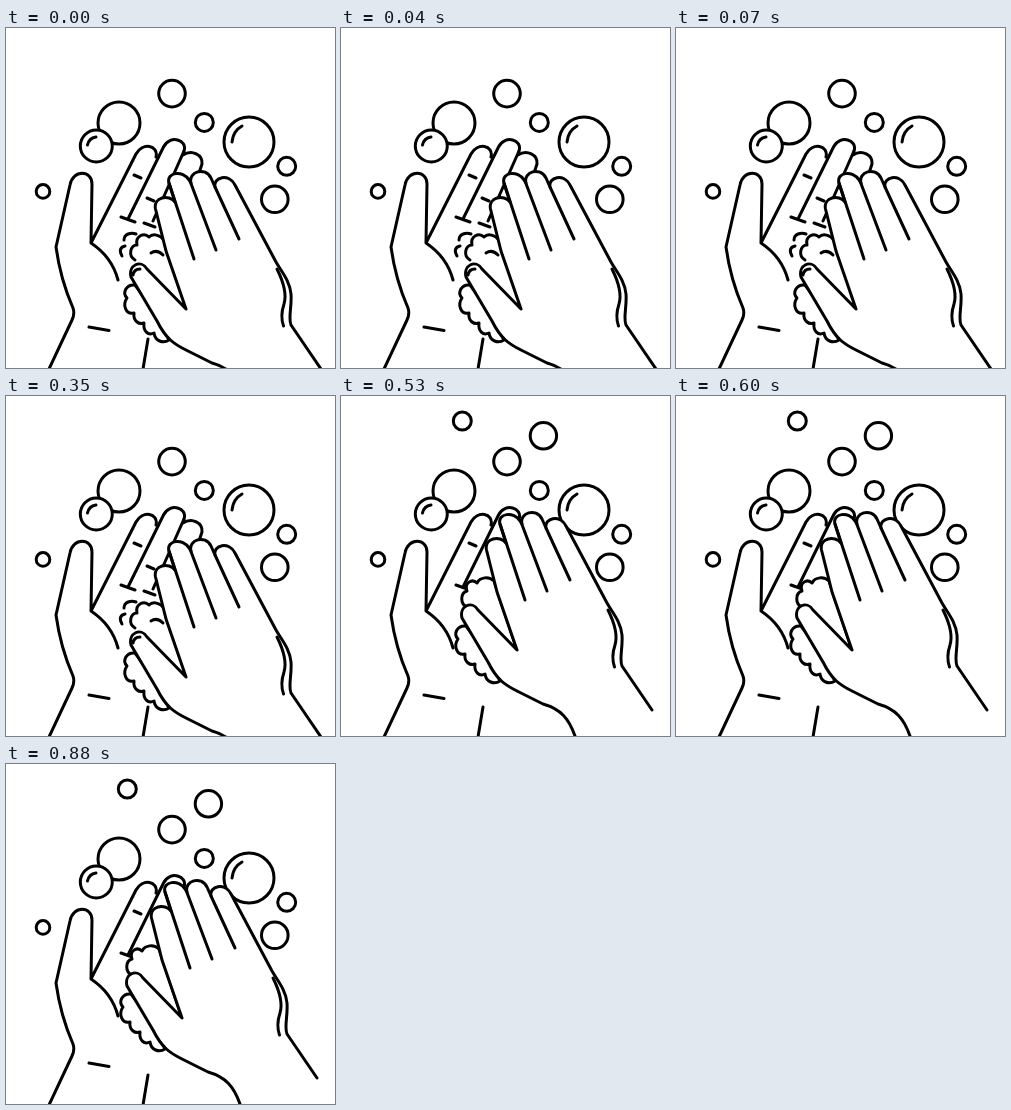
These frames come from a looping animation (329 by 340 pixels, 1.07 s). An HTML page:

```html
<!DOCTYPE html>
<html lang="en">
<head>
<meta charset="utf-8">
<title>Washing hands</title>
<style>
html, body { margin: 0; width: 100%; height: 100%; overflow: hidden; background: #fff; }
svg { display: block; width: 100%; height: 100%; fill: #fff; stroke: #000; stroke-width: 3; stroke-linecap: round; stroke-linejoin: round; }
.line { fill: none; }
</style>
</head>
<body>
<svg viewBox="0 0 329 340">
  <g id="bubbles"></g>
  <path class="line" d="M81.5 117Q83 110 90 109M226 114Q227 103 236 98"/>

  <!-- left hand -->
  <g class="line">
    <path d="M43 341L66 292Q69 286 67 280C60 264 53 241 50 219L64 157C67 141 86 142 86 156L85 215L130 126C136 114 153 117 150 129M85 215Q106 229 112 252"/>
    <path d="M122 191L157.500 119C164 106 182 112 178 123M128 147L135 150M115 189L129 194M83 299L103 302.500M142 311L137 341"/>
  </g>

  <!-- lower pose: fingers and foam exposed -->
  <g id="low">
    <path class="line" d="M178 123L147 193M177 127C186 121 197 127 196 136L193 145M141 170L148 173M138 195L149 199"/>
    <path d="M128 232C122 227 124 217 131 217C129 208 138 204 143 209C147 205 154 207 158 212L181 280L126 240Z" stroke="none"/>
    <path class="line" d="M116 228C113 223 114 219 119 218M118 212C118 206 125 204 130 206M129 232C122 228 124 217 131 217C129 208 138 204 143 209C147 205 154 207 158 212M145 225Q151 221 157 227"/>
  </g>

  <!-- upper pose -->
  <path id="high" d="M126 211C119 208 119 197 126 195C123 187 131 182 136 187C139 181 148 180 153 185L176 254Z"/>

  <g id="hand">
    <path d="M129 257C120 256 116 265 121 270C116 277 120 287 128 285C127 293 133 297 138 295C137 303 142 308 148 305C149 313 157 316 163 312L150 285Z"/>
    <path d="M315 341L285 297C282 290 286 279 285 266C284 253 275 243 270 234L229 157C223 145 207 149 209 159L205 150C199 138 182 144 185 155L183 152C177 142 160 144 163 155L169 174C163 166 147 169 149.500 181L160 223L180 281L141 241C135 231 122 237 125 249L151 293C160 311 168 316 180 322L206 335C224 340 232 350 238 367"/>
    <path class="line" d="M209 159L233 211M184 153L210 222M163 155L188 231M271 241C277 253 281 266 278 276Q274 288 277.500 298"/>
  </g>
  <path id="nail" class="line" d="M127 247Q128 241 134 241"/>
</svg>
<script>
const byId = id => document.getElementById(id);
const circle = ([x, y, r]) => `<circle cx="${x}" cy="${y}" r="${r}"/>`;
const bubbles = [
  [113, 95, 21], [90.3, 118, 16], [166, 65.6, 13.3], [198.3, 94.4, 9],
  [243, 114, 25], [280.7, 138.3, 9], [268.8, 171.3, 13.3], [37, 163.4, 6.8]
];
const extra = [[121.3, 25, 9], [202.4, 39.8, 13.2]];
byId('bubbles').innerHTML =
  bubbles.map(circle).join('') + `<g id="extra">${extra.map(circle).join('')}</g>`;

const show = (id, on) => byId(id).setAttribute('visibility', on ? 'visible' : 'hidden');

function draw() {
  const up = performance.now() % 1070 >= 530;
  show('low', !up);
  show('nail', !up);
  show('high', up);
  show('extra', up);
  byId('hand').setAttribute('transform', up ? 'translate(-4 -27)' : '');
  requestAnimationFrame(draw);
}
draw();
</script>
</body>
</html>
```
